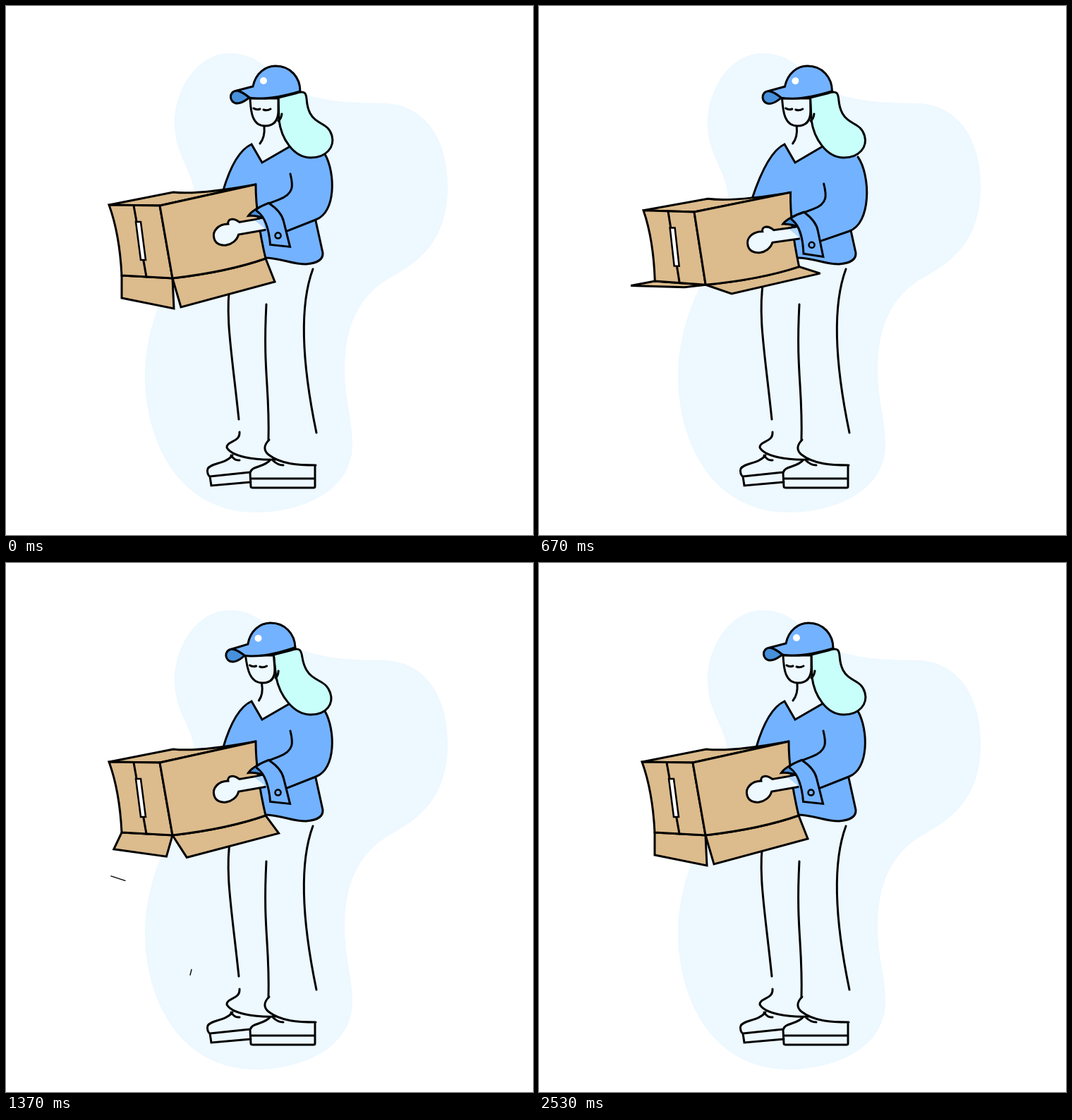
Animation of 747x750 px, one loop 2.56 s. Source, as an HTML page with a canvas:

```html
<!DOCTYPE html>
<html lang="en">
<head>
<meta charset="utf-8">
<title>Shaking the box</title>
<style>
  html, body { margin: 0; width: 100%; height: 100%; overflow: hidden; background: #fff; }
  canvas { display: block; }
</style>
</head>
<body>
<canvas id="stage" width="747" height="750"></canvas>
<script>
const ctx = document.getElementById('stage').getContext('2d');
const LOOP = 2560;
const INK = '#000', BLUE = '#73b2ff', SHADE = '#4690dc', PALE = '#edf8ff',
      HAIR = '#c8fffb', CARD = '#dcbb8c';

const rad = deg => deg * Math.PI / 180;
const clamp = k => Math.min(1, Math.max(0, k));
const smooth = k => k * k * (3 - 2 * k);
const mix = (a, b, k) => Array.isArray(a) ? a.map((v, i) => mix(v, b[i], k)) : a + (b - a) * k;
const add = (a, b) => [a[0] + b[0], a[1] + b[1]];
const rotate = ([u, v], deg) => {
  const c = Math.cos(rad(deg)), s = Math.sin(rad(deg));
  return [u * c - v * s, u * s + v * c];
};

// keys: [time, value] pairs, eased between neighbours
function track(keys, t) {
  let i = 1;
  while (i < keys.length - 1 && t > keys[i][0]) i++;
  const [t0, a] = keys[i - 1], [t1, b] = keys[i];
  return mix(a, b, smooth(clamp((t - t0) / (t1 - t0))));
}

function draw(path, fill, stroke = INK, width = 3) {
  const p = new Path2D(path);
  if (fill) { ctx.fillStyle = fill; ctx.fill(p); }
  if (stroke) { ctx.strokeStyle = stroke; ctx.lineWidth = width; ctx.stroke(p); }
}
const poly = pts => `M${pts.join('L')}Z`;

function placed([x, y], deg, paint) {
  ctx.save();
  ctx.translate(x, y);
  ctx.rotate(rad(deg));
  paint();
  ctx.restore();
}

// Box corner x, y and tilt in degrees; body, arm and hand all follow from it
const rest = [218, 283, 0], raise = [232, 236, 5.8], dip = [220, 292, 1], lift = [241.5, 220, 10];
const boxKeys = [[0, rest], [370, raise], [430, raise], [670, dip], [870, lift], [1020, lift], [1240, rest]];
const spreadKeys = [[430, 0], [670, 1], [870, 0], [1020, 0], [1240, 1], [1370, .33], [2070, -.05], [2530, 0]];
const leanKeys = [[370, 0], [1370, -7], [1610, -7], [2530, 0]];

const scraps = [
  { start: 870, time: 500, from: [256, 479], to: [262, 580], size: 8 },
  { start: 1370, time: 700, from: [159, 447], to: [118, 522], size: 21 }
];

const blob = `M317 67C370 67 385 116 430 127C470 138 500 137 537 138C595 140 626 190 626 255
  C626 330 590 360 545 385C500 410 480 455 480 515C480 560 490 580 491 620C492 690 415 718 355 718
  C240 718 197 610 197 525C197 470 215 420 240 375C265 335 272 300 267 262
  C260 225 239 210 239 165C239 120 270 67 317 67Z`;

const shoes = `M331 604C332 619 313 616 313 626C320 639 352 644 382 643
  M373 615C365 623 365 630 372 636C390 650 415 651 439 651
  M321 637C312 649 290 648 286 656C284 661 287 666 289 667L346 661
  M289 667L291 680L347 675M319 637Q324 645 331 644
  M375 643C366 655 348 651 346 662L347 681Q347 683 350 683H436Q438 683 438 681V653
  M347 670H438M378 644Q385 651 393 651`;

// A trouser line; its bow flattens towards the straight line as the body stretches
function drawLeg(top, bow1, bow2, foot, stretch) {
  const k = stretch * .8;
  draw(`M${top}C${mix(bow1, mix(top, foot, 1 / 3), k)} ${mix(bow2, mix(top, foot, 2 / 3), k)} ${foot}`);
}

function drawTorso(tilt, sag, stretch, wrist, cuffTilt) {
  const peak = [348, 196 - 5 * stretch], collar = [401 - tilt / 2, 200];
  const side = [308 - sag / 2, 261 + sag - 50 * stretch];
  const front = `M${side}Q${324} ${207 - 14 * stretch} ${peak}L363 ${222 - 4 * stretch}L${collar}`;
  const hemY = 366 - 5 * stretch;
  const hem = `L438 300L449 ${hemY - 16}Q450 ${hemY - 2} 425 ${hemY}C404 ${hemY} 390 ${hemY - 9} 366 ${hemY - 9}`;
  const shoulder = [452, 210 + sag / 3];
  draw(`${front}L${shoulder}${hem}L320 335Z`, BLUE, null);
  draw(front);
  draw('M' + hem.slice(1));

  const bulge = 468 + .8 * tilt + 8 * Math.sin(rad(18 * tilt));
  const elbow = [439, 303 + 1.3 * tilt + 1.3 * sag];
  const under = add(wrist, rotate([31, 9], cuffTilt)), over = add(wrist, rotate([5, -30], cuffTilt));
  const outer = `M${shoulder}C${bulge - 1} ${236 + sag / 3} ${bulge} ${elbow[1] - 10} ${elbow}L${under}`;
  const fold = [403 + .7 * tilt, 238 + 1.2 * sag], bend = add(fold, [6, 28]);
  draw(`${outer}L${over}L${fold}Z`, BLUE, null);
  draw(outer);
  draw(`M${fold}C${add(fold, [4, 16])} ${bend} ${mix(bend, over, .6)}L${over}`);
}

function drawHead(lean) {
  ctx.save();
  // Lean sideways in proportion to the height above the shoulders
  ctx.transform(1, 0, -lean / 90, 1, lean * 215 / 90, 0);
  draw(`M386 130L387 162C390 187 407 215 432 215C455 215 466 199 462 184C457 165 440 169 431 152
    C424 138 428 130 424 124Q421 120 410 124Z`, HAIR);
  draw('M346 132C347 150 349 170 367 170C382 170 386 160 386 148V131H346Z', PALE);
  draw('M391 153Q390 160 386 163M366 171C367 182 364 190 360 195');
  draw('M351 145Q355 148 360 146M365 147Q370 149 375 146');
  ctx.restore();

  placed([382 + lean, 120], lean * .3, () => {
    ctx.translate(-382, -120);
    draw(`M327 120L350 114C354 95 368 85 382 85C404 85 417 102 417 121C400 126 380 131 362 131
      C355 131 350 131 345 130C339 125 334 121 327 120Z`, BLUE);
    draw('M327 120C315 121 316 138 328 138C336 138 340 133 345 130C339 125 334 121 327 120Z', SHADE);
    ctx.beginPath();
    ctx.arc(365, 106, 5, 0, 7);
    ctx.fillStyle = '#fff';
    ctx.fill();
  });
}

function drawBox(corner, tilt, spread) {
  const at = (u, v) => add(corner, rotate([u, v], tilt));
  // Flap edges swing from hanging below the hinge to lying flat
  const flap = (u, v, hang, flat) => at(...add([u, v], mix(hang, flat, spread)));
  const topLeft = at(-72, -1), back = at(19, -19), topRight = at(136, -30);
  const lowLeft = at(-54, 99), low = at(18, 103), lowRight = at(150, 75);
  const lowEdge = `Q${at(96, 94)} `;

  draw(poly([lowLeft, low, flap(18, 103, [2, 43], [-30, 4]), flap(-54, 99, [0, 32], [-34, 7])]), CARD);
  draw(`M${low}${lowEdge}${lowRight}L${flap(150, 75, [13, 33], [30, 9])}L${flap(18, 103, [12, 41], [37, 12])}Z`, CARD);
  draw(`M${topLeft}L${back}Q${at(55, -15)} ${topRight}L${corner}Z`, CARD);
  draw(`M${topLeft}Q${at(-57, 40)} ${lowLeft}L${low}L${corner}Z`, CARD);
  draw(`M${corner}L${topRight}Q${at(136, 15)} ${lowRight}${lowEdge}${low}Z`, CARD);
  draw(`M${at(-37, 0)}L${at(-19, 101)}`);
  draw(poly([at(-34, 23), at(-27, 23), at(-20, 77), at(-27, 77)]), '#fff', INK, 2.5);
}

function drawHand(hand, handTilt, wrist, cuffTilt) {
  placed(wrist, cuffTilt, () => {
    draw('M-23 -13Q-17 -22 6 -31L5 -8Z', SHADE, null);
    draw('M5 -8Q-12 -14 -23 -13Q-17 -22 6 -31');
  });
  placed(hand, handTilt, () => {
    draw('M55 -10L22 -12C15 -21 6 -20 6 -13C-8 -16 -19 -8 -18 3C-17 18 8 21 17 5L55 7', PALE);
    draw('M44 -9L55 -9L56 6Z', '#b5d8ff', null);
  });
  placed(wrist, cuffTilt, () => {
    draw('M-10 -19Q-17 -22 6 -31Q24 -19 27 -5L36 31L8 28Q5 -8 -10 -19Z', BLUE);
    ctx.beginPath();
    ctx.arc(19, 15, 4, 0, 7);
    ctx.lineWidth = 2.6;
    ctx.stroke();
  });
}

function drawScrap({ start, time, from, to, size }, t) {
  const k = (t - start) / time;
  if (k < -.15 || k > 1.08) return;
  placed(mix(from, to, k), 18 + 86 * k, () => draw(`M${-size / 2} 0H${size / 2}`, null, INK, 1.4));
}

function render(now) {
  const t = now % LOOP;
  const [x, y, tilt] = track(boxKeys, t);
  const sag = 1.3 * Math.max(0, y - rest[1]);
  const stretch = smooth(clamp((tilt - 6) / 4));
  const hand = add([x, y], rotate([94, 40], tilt));
  const handTilt = 2 * tilt - 13, cuffTilt = 2.6 * tilt;
  const wrist = add(hand, rotate([56, 0], handTilt));

  ctx.fillStyle = '#fff';
  ctx.fillRect(0, 0, 747, 750);
  ctx.lineCap = 'round';
  ctx.miterLimit = 2.5;
  draw(blob, PALE, null);
  drawLeg([318, 389], [310, 440], [320, 490], [330, 586], stretch);
  drawLeg([369, 423], [364, 520], [374, 540], [372, 616], stretch);
  drawLeg([435, 373], [412, 435], [424, 528], [440, 605], stretch);
  draw(shoes);
  drawTorso(tilt, sag, stretch, wrist, cuffTilt);
  drawHead(track(leanKeys, t));
  drawBox([x, y], tilt, track(spreadKeys, t));
  drawHand(hand, handTilt, wrist, cuffTilt);
  scraps.forEach(scrap => drawScrap(scrap, t));
}

const start = performance.now();
function loop() {
  render(performance.now() - start);
  requestAnimationFrame(loop);
}
loop();
</script>
</body>
</html>
```
